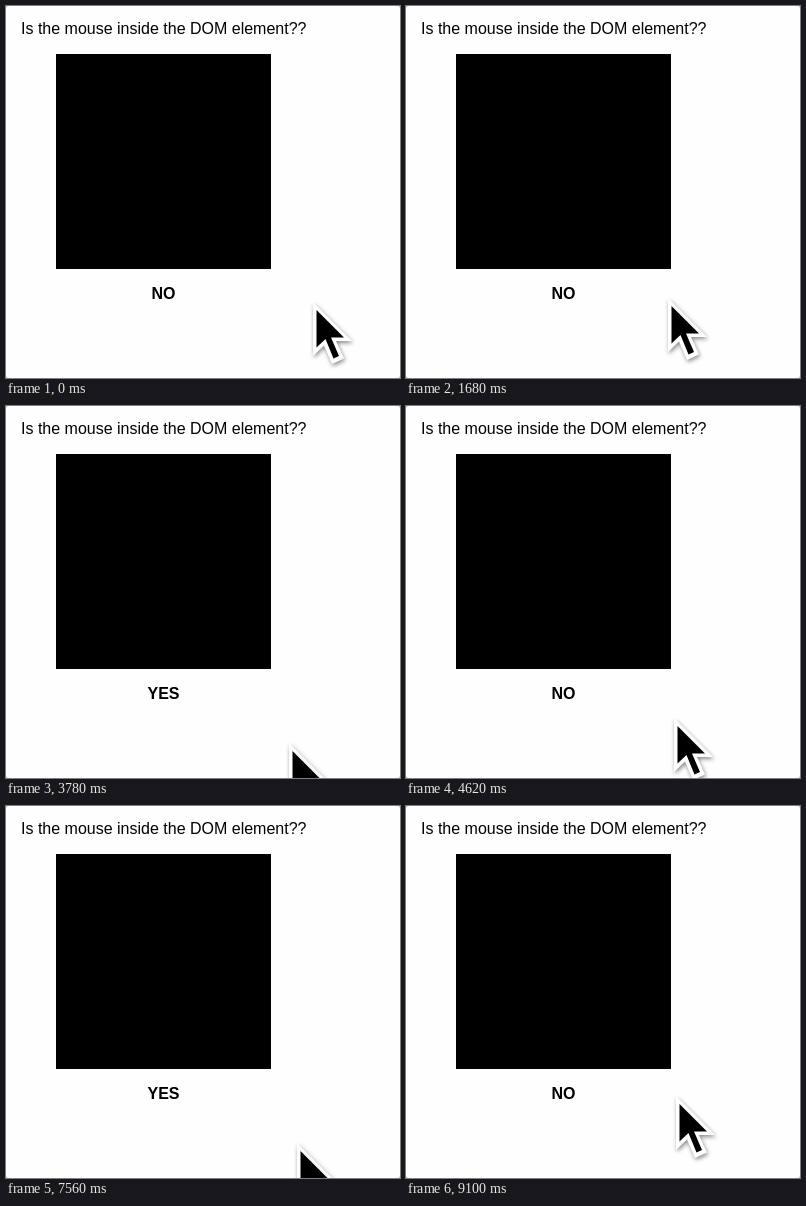
These frames come from a looping animation (394x372 px, 9170 ms). An HTML page:

```html
<!DOCTYPE html>
<html lang="en">
<head>
<meta charset="utf-8">
<title>Mouse inside element</title>
<style>
  html, body { margin: 0; width: 100%; height: 100%; overflow: hidden; background: #999; }
  svg { display: block; width: 394px; height: 372px; }
  text { font: 16px "Liberation Sans", Arial, sans-serif; }
  #answer { font-weight: bold; text-anchor: middle; }
  #cursor { filter: drop-shadow(1px 2px 2px rgba(0, 0, 0, .45)); }
</style>
</head>
<body>
<svg viewBox="0 0 394 372">
  <rect width="394" height="372" rx="2" fill="#fefefe"/>
  <text x="15" y="28">Is the mouse inside the DOM element??</text>
  <rect x="50" y="48" width="215" height="215"/>
  <text id="answer" x="157.5" y="293">NO</text>
  <g id="cursor" transform="translate(307 296)">
    <path fill="#fff" d="M0 0V54L11 43.5L19 62L31 56.5L23 39H39Z"/>
    <path d="M3.5 8V45.5L12.5 37L20.5 56.5L26 54L18 35.5H31Z"/>
  </g>
</svg>
<script>
  const LOOP = 9170, STEP = 70;
  const answer = document.getElementById("answer");
  const cursor = document.getElementById("cursor");

  // [start ms, steps, x, y, answer]; the answer flips as the move starts
  const moves = [
    [0, 1, 307, 296, "NO"],
    [70, 1, 288, 300, "NO"],
    [140, 1, 269, 294, "NO"],
    [490, 5, 187, 178, "YES"],
    [1470, 5, 291, 337, "NO"],
    [2240, 5, 181, 170, "YES"],
    [3220, 5, 283, 337, "NO"],
    [3780, 5, 188, 181, "YES"],
    [4200, 3, 268, 312, "NO"],
    [4900, 5, 188, 181, "YES"],
    [5250, 4, 283, 337, "NO"],
    [5810, 3, 252, 291, "YES"],
    [6020, 1, 205, 217, "YES"],
    [6090, 1, 181, 170, "YES"],
    [6790, 4, 291, 337, "NO"],
    [7560, 5, 187, 178, "YES"],
    [8470, 5, 269, 291, "NO"],
    [9100, 1, 270, 290, "NO"]
  ];

  // Slow start, quick middle, soft stop
  function ease(t) {
    const u = t ** 1.5;
    return u * u * (3 - 2 * u);
  }

  function draw(ms) {
    const i = moves.findLastIndex(m => m[0] <= ms);
    const [start, steps, x, y, label] = moves[i];
    const [, , fromX, fromY] = moves[Math.max(i - 1, 0)];
    const step = Math.floor((ms - start) / STEP);
    const k = steps > 1 ? ease(Math.min(step / (steps - 1), 1)) : 1;
    const px = Math.round(fromX + (x - fromX) * k);
    const py = Math.round(fromY + (y - fromY) * k);
    cursor.setAttribute("transform", `translate(${px} ${py})`);
    answer.textContent = label;
  }

  function tick() {
    draw(performance.now() % LOOP);
    requestAnimationFrame(tick);
  }
  tick();
</script>
</body>
</html>
```
